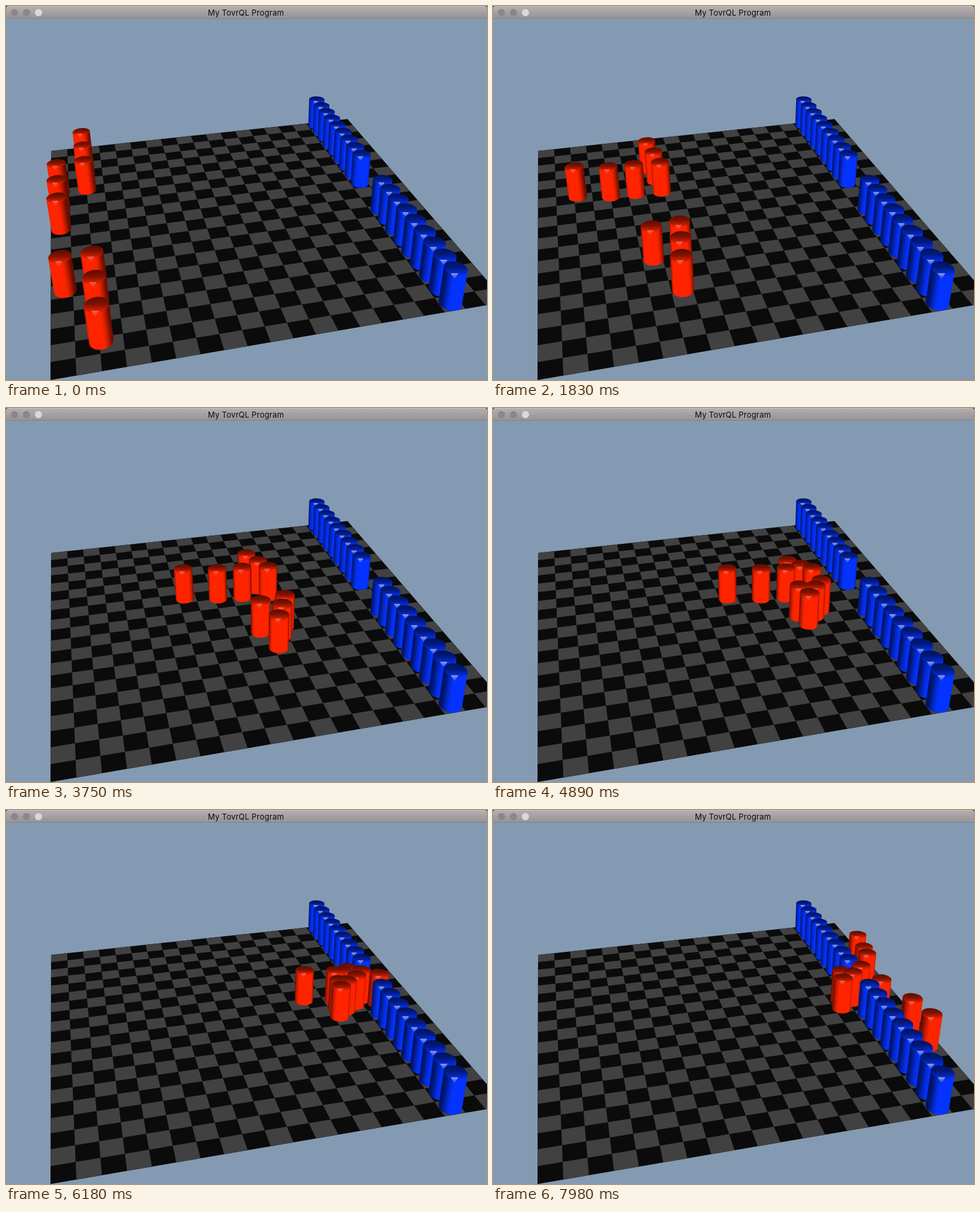
These frames come from a looping animation (800x622 px, 8 s). An HTML page with a canvas:

```html
<!DOCTYPE html>
<html lang="en">
<head>
<meta charset="utf-8">
<title>Board</title>
<style>
  html, body { margin: 0; width: 100%; height: 100%; overflow: hidden; background: #000; }
  .window { position: relative; width: 800px; height: 622px; overflow: hidden; border-radius: 4px 4px 0 0; background: #849ab2; }
  canvas { position: absolute; left: 0; top: 0; }
  .bar {
    position: absolute; left: 0; top: 0; width: 800px; height: 21px; box-sizing: border-box;
    background: linear-gradient(#b3afb1, #979395); border-top: 1px solid #c4c0c2; border-bottom: 1px solid #858284;
    font: 13px/20px Inter, Roboto, sans-serif; letter-spacing: 0.2px; text-align: center; color: #0a0a0a;
  }
  .bar span { position: relative; left: -1px; }
  .bar i { position: absolute; top: 4px; width: 12px; height: 12px; border-radius: 50%; background: #8b8789; }
</style>
</head>
<body>
<div class="window">
  <canvas id="stage" width="800" height="622"></canvas>
  <div class="bar">
    <i style="left:8px"></i><i style="left:28px"></i><i style="left:48px;background:#dad8d9"></i>
    <span>My TovrQL Program</span>
  </div>
</div>
<script>
const ctx = document.getElementById('stage').getContext('2d');
const LOOP = 8000, STEP = 30, CELLS = 20, RADIUS = 0.0255;
const RED = [255, 36, 0], BLUE = [4, 51, 255];

// Camera columns: board x, board y, one pin height upwards, board origin.
const U = [544.5, -35.95, 0.0907], V = [-29.14, 144.5, -0.3803];
const UP = [-8.5, -50, -0.02], ORIGIN = [75, 241, 1];

const depth = (u, v) => U[2] * u + V[2] * v + 1;

function project(u, v, h = 0) {
  const [x, y, w] = ORIGIN.map((o, i) => U[i] * u + V[i] * v + UP[i] * h + o);
  return [x / w, y / w];
}

// The pins walk to a gate in the wall, pass it one by one and spread out behind it.
const SPEED = 0.1385, SPACING = 0.094;
const GATE = [0.875, 0.5], CORNER = [0.027, 0.295];
const FIRST_PASS = 6, PASS_GAP = 0.29;

// turns: numbers of places in passing order; the members behind a file's leader go round the corner.
const squads = [
  { u: 0.102, v: 0.087, turns: [3, 1, 0] },
  { u: 0.027, v: 0.275, turns: [4, 6, 8], file: true },
  { u: 0.104, v: 0.725, turns: [2, 5, 9] },
  { u: 0.033, v: 0.725, turns: [7] }
];
const DOWNWARD = [0, 2, 5];

const distance = (a, b) => Math.hypot(b[0] - a[0], b[1] - a[1]);
const pathLength = path => path.slice(1).reduce((sum, p, i) => sum + distance(path[i], p), 0);

function travel(path, s) {
  let i = 0;
  while (i < path.length - 2 && s > distance(path[i], path[i + 1])) s -= distance(path[i], path[++i]);
  const k = Math.min(1, s / distance(path[i], path[i + 1]));
  return path[i].map((c, j) => c + (path[i + 1][j] - c) * k);
}

const walkers = squads.flatMap(({ u, v, turns, file }) => turns.map((turn, k) => {
  const side = DOWNWARD.includes(turn) ? 1 : -1;
  const start = [u, v + SPACING * k];
  return {
    pass: FIRST_PASS + PASS_GAP * turn,
    approach: file && k ? [start, CORNER, GATE] : [start, GATE],
    exit: [GATE, [0.94, 0.5 + 0.09 * side], [0.975, 0.5 + 0.3 * side]]
  };
}));

function place({ pass, approach, exit }, t) {
  if (t >= pass) return travel(exit, SPEED * (t - pass));
  const length = pathLength(approach);
  const queue = 0.08 * Math.sqrt(pass - t);
  return travel(approach, Math.min(SPEED * t, length - queue));
}

const wall = [];
for (let k = 0; k < CELLS; k++) {
  if (k !== 9 && k !== 10) wall.push({ at: [0.876, (k + 0.5) / CELLS], color: BLUE });
}

const shade = (color, light) => `rgb(${color.map(c => Math.round(c * light))})`;
const tint = (color, k) => `rgb(${color.map(c => Math.round(c + (200 - c) * k))})`;

function fill(points, style) {
  ctx.beginPath();
  points.forEach(p => ctx.lineTo(p[0], p[1]));
  ctx.closePath();
  ctx.fillStyle = style;
  ctx.fill();
}

function ring(u, v, h) {
  return Array.from({ length: 28 }, (_, i) => {
    const a = i / 28 * Math.PI * 2;
    return project(u + RADIUS * Math.cos(a), v + RADIUS * Math.sin(a), h);
  });
}

function drawBoard() {
  const corner = (i, j) => project(i / CELLS, j / CELLS);
  fill([corner(0, 0), corner(CELLS, 0), corner(CELLS, CELLS), corner(0, CELLS)], '#0b0b0b');
  for (let i = 0; i < CELLS; i++) {
    for (let j = i % 2; j < CELLS; j += 2) {
      fill([corner(i, j), corner(i + 1, j), corner(i + 1, j + 1), corner(i, j + 1)], '#414141');
    }
  }
}

function drawPin({ at: [u, v], color }) {
  const base = ring(u, v, 0), cap = ring(u, v, 1);
  const [bx, by] = project(u, v, 0), [tx, ty] = project(u, v, 1);
  const len = Math.hypot(bx - tx, by - ty);
  const nx = (by - ty) / len, ny = (tx - bx) / len;
  const across = p => p[0] * nx + p[1] * ny;
  const side = (points, sign) => points.reduce((best, p) => sign * across(p) > sign * across(best) ? p : best);

  // Light turns round the body with the pin's place on the stage.
  const mx = (bx + tx) / 2, my = (by + ty) / 2;
  const half = (side(cap, 1)[0] - side(cap, -1)[0]) / 2;
  const turn = (tx - 400) / 450;
  const body = ctx.createLinearGradient(mx - nx * half, my - ny * half, mx + nx * half, my + ny * half);
  for (let i = 0; i <= 10; i++) {
    const facing = Math.cos(Math.asin(i / 5 - 1) - turn);
    body.addColorStop(i / 10, shade(color, Math.min(1, 0.4 + 0.85 * Math.max(0, facing))));
  }
  fill(base, body);
  fill([side(cap, -1), side(cap, 1), side(base, 1), side(base, -1)], body);

  const ys = cap.map(p => p[1]);
  const back = Math.min(...ys), front = Math.max(...ys);
  const lid = ctx.createLinearGradient(0, back, 0, front);
  lid.addColorStop(0, shade(color, 0.35));
  lid.addColorStop(0.45, shade(color, 0.5));
  lid.addColorStop(1, shade(color, 0.95));
  fill(cap, lid);

  const sx = tx - 2, r = half * 0.32;
  const shine = ctx.createLinearGradient(0, front - r * 0.6, 0, front + r);
  shine.addColorStop(0, tint(color, color === BLUE ? 0.75 : 0.4));
  shine.addColorStop(1, shade(color, 1));
  fill([[sx - r, front - r * 0.6], [sx + r, front - r * 0.6], [sx, front + r]], shine);
}

function draw(now) {
  const t = Math.floor(now % LOOP / STEP) * STEP / 1000;
  ctx.clearRect(0, 0, 800, 622);
  drawBoard();
  walkers.map(walker => ({ at: place(walker, t), color: RED }))
    .concat(wall)
    .sort((a, b) => depth(...b.at) - depth(...a.at))
    .forEach(drawPin);
}

const start = performance.now();
function tick() {
  draw(performance.now() - start);
  requestAnimationFrame(tick);
}
tick();
</script>
</body>
</html>
```
